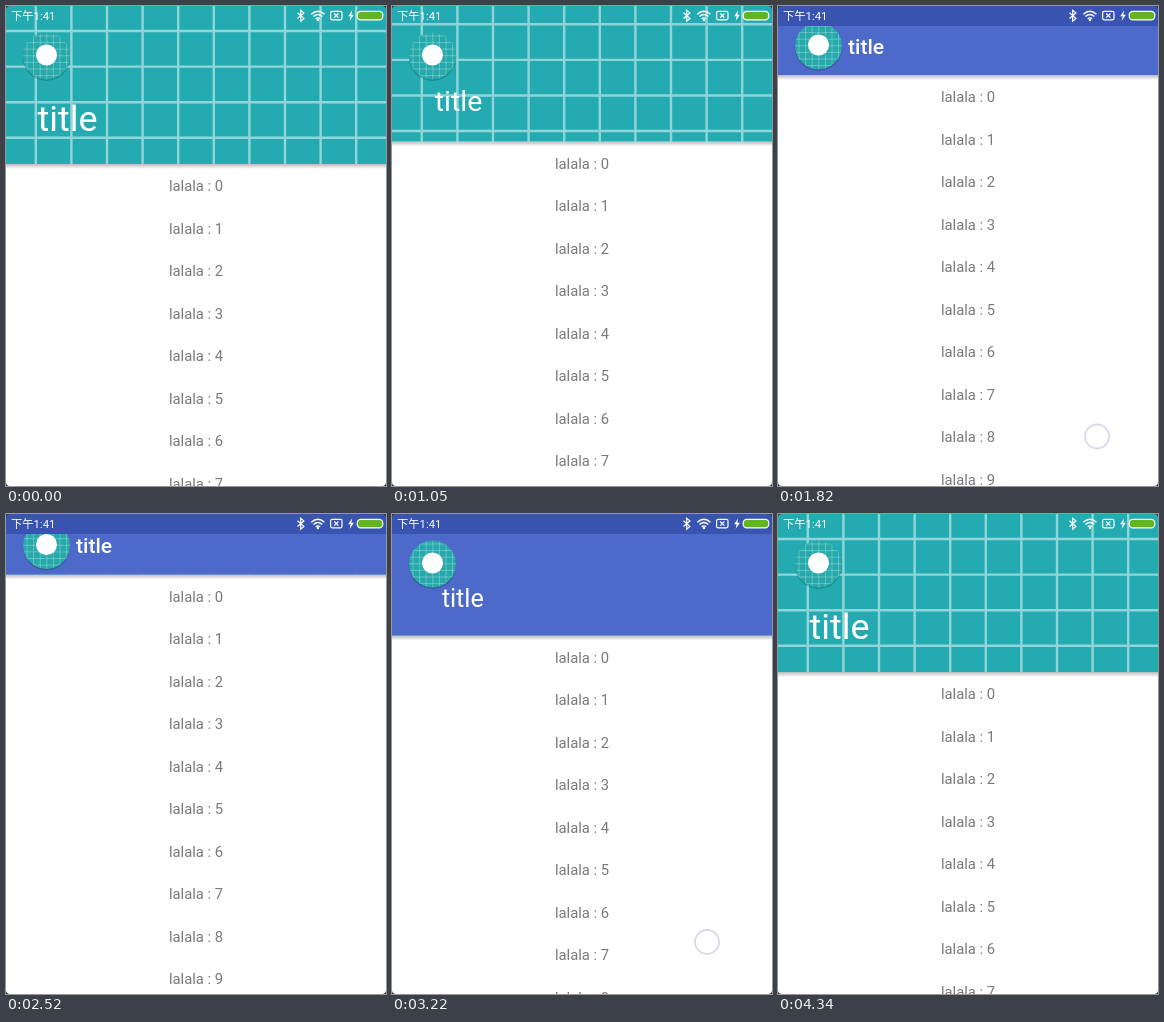
Animation of 380 by 480 pixels, one loop 4.41 s. Source, as an HTML page:

```html
<!DOCTYPE html>
<html lang="zh">
<head>
<meta charset="utf-8">
<style>
html, body { margin: 0; width: 100%; height: 100%; overflow: hidden; background: #fff; }
svg { display: block; width: 380px; height: 480px; font-family: Roboto, "Noto Sans CJK SC", sans-serif; }
</style>
</head>
<body>
<svg viewBox="0 0 380 480">
  <defs>
    <linearGradient id="fade" x2="0" y2="1">
      <stop stop-color="#000" stop-opacity=".27"/>
      <stop offset="1" stop-color="#000" stop-opacity="0"/>
    </linearGradient>
    <clipPath id="headerClip"><rect id="clipRect" width="380" height="158"/></clipPath>
    <clipPath id="discClip"><circle r="23.5"/></clipPath>
  </defs>
  <rect width="380" height="480" fill="#fff"/>
  <g id="rows" fill="#7a7a7a" font-size="14.8" text-anchor="middle"></g>
  <rect id="shadow" width="380" height="5" fill="url(#fade)"/>
  <g clip-path="url(#headerClip)">
    <rect width="380" height="160" fill="#24abb1"/>
    <path id="grid" fill="none" stroke="#fff" stroke-opacity=".5" stroke-width="2.4"/>
    <rect id="scrim" width="380" height="160" fill="#4d69c9"/>
    <g id="icon">
      <circle cy="1.2" r="23.7" fill="#000" opacity=".2"/>
      <circle r="23.5" fill="#25a9ab"/>
      <path id="mesh" clip-path="url(#discClip)" fill="none" stroke="#fff" stroke-opacity=".35" stroke-width=".8"/>
      <circle cy="-1" r="10.5" fill="#fff"/>
    </g>
    <text id="title" fill="#fff">title</text>
    <rect id="statusScrim" width="380" height="20" fill="#3853b0"/>
  </g>
  <g fill="none" stroke="#fff" stroke-width="1.2">
    <text x="5" y="14" font-size="11.3" fill="#fff" stroke="none">下午1:41</text>
    <path d="M291.5 6.8l6.4 5.6-3.2 2.8V4.2l3.2 2.7-6.4 5.6"/>
    <path d="M305.3 8.2q6.6-6 13.2 0M307.5 10.6q4.4-4 8.8 0M309.7 12.8q2.2-1.8 4.4 0" stroke-width="1.4"/>
    <circle cx="311.9" cy="14" r=".6"/>
    <rect x="324.6" y="5.4" width="11.4" height="8.4" rx="1.5"/>
    <path d="M328.2 7.5l4.2 4.2m0-4.2l-4.2 4.2"/>
    <path d="M346.2 4.2l-4 6h2.5l-1.1 4.8 4.3-6.2h-2.6z" fill="#fff" stroke="none"/>
    <rect x="351.2" y="5.3" width="25.6" height="8.6" rx="3.6" fill="#62b51f"/>
  </g>
  <circle id="finger" r="12" fill="#fff" fill-opacity=".75" stroke="#d9dae6" stroke-width="1.8"/>
  <path d="M0 0h4Q0 0 0 4zM380 0v4Q380 0 376 0zM0 480v-4Q0 480 4 480zM380 480h-4Q380 480 380 476z" fill="#333"/>
</svg>
<script>
const LOOP = 4410, STEP = 70;
const FULL = 158, RANGE = 77.5;
const $ = id => document.getElementById(id);
const set = (id, attrs) => { for (const k in attrs) $(id).setAttribute(k, attrs[k]); };
const clamp = v => Math.min(1, Math.max(0, v));
const mix = (a, b, u) => a + (b - a) * u;

// header height over time: [ms, px]
const drag = [[0, 158], [530, 158], [1050, 135.5], [1470, 114], [1820, 69], [2080, 60.5],
  [2590, 60.5], [3220, 121.5], [3680, 158], [LOOP, 158]];

const slope = i => (drag[i + 1][1] - drag[i][1]) / (drag[i + 1][0] - drag[i][0]);

// harmonic mean of neighbouring slopes keeps the curve monotone
function tangent(i) {
  if (i === 0 || i === drag.length - 1) return 0;
  const a = slope(i - 1), b = slope(i);
  return a * b > 0 ? 2 * a * b / (a + b) : 0;
}

function headerHeight(t) {
  let i = 0;
  while (t >= drag[i + 1][0]) i++;
  const [t0, h0] = drag[i], [t1, h1] = drag[i + 1];
  const d = t1 - t0, u = (t - t0) / d, v = 1 - u;
  return h0 * v * v * (1 + 2 * u) + h1 * u * u * (3 - 2 * u)
    + d * u * v * (tangent(i) * v - tangent(i + 1) * u);
}

function scrimAlpha(t) {
  return t < 2500 ? clamp((t - 1020) / 600) ** 1.6 : (1 - clamp((t - 3370) / 600)) ** 2.5;
}

function lines(count, x0, y0, gap, size) {
  let d = "";
  for (let i = 0; i < count; i++) {
    d += `M${x0 + i * gap} ${y0 - gap}v${size}M${x0 - gap} ${y0 + i * gap}h${size}`;
  }
  return d;
}

set("grid", { d: lines(10, 29.8, 25, 35.6, 420) });
set("mesh", { d: lines(7, -19.5, -20, 6.6, 60) });
for (let i = 0; i < 11; i++) {
  $("rows").innerHTML += `<text x="190" y="${27.4 + i * 42.5}">lalala : ${i}</text>`;
}

function draw(t) {
  const h = headerHeight(t), alpha = scrimAlpha(t);
  const f = clamp((FULL - h) / RANGE);
  const size = mix(35.9, 21.1, 1 - (1 - f) ** 2);

  set("rows", { transform: `translate(0 ${h})` });
  set("shadow", { y: h });
  set("clipRect", { height: h });
  set("grid", { transform: `translate(0 ${(h - FULL) * 0.3})` });
  set("scrim", { opacity: alpha });
  set("statusScrim", { opacity: alpha });
  set("icon", { transform: `translate(40.5 ${Math.min(50, h - 29)})` });
  set("title", {
    x: mix(31.5, 70, f),
    y: h + mix(-46, -29, f) + 0.37 * size,
    "font-size": size,
    "font-weight": f > 0.99 ? 500 : 400
  });

  const up = t >= 560 && t < 2450, down = t >= 2660 && t < 3700;
  set("finger", {
    visibility: up || down ? "visible" : "hidden",
    cx: up ? 293 + (114 - h) * 0.58 : 315,
    cy: h + (up ? 361.5 : 306.5)
  });
}

function tick(now) {
  draw(Math.floor(now % LOOP / STEP) * STEP);
  requestAnimationFrame(tick);
}
draw(0);
requestAnimationFrame(tick);
</script>
</body>
</html>
```
